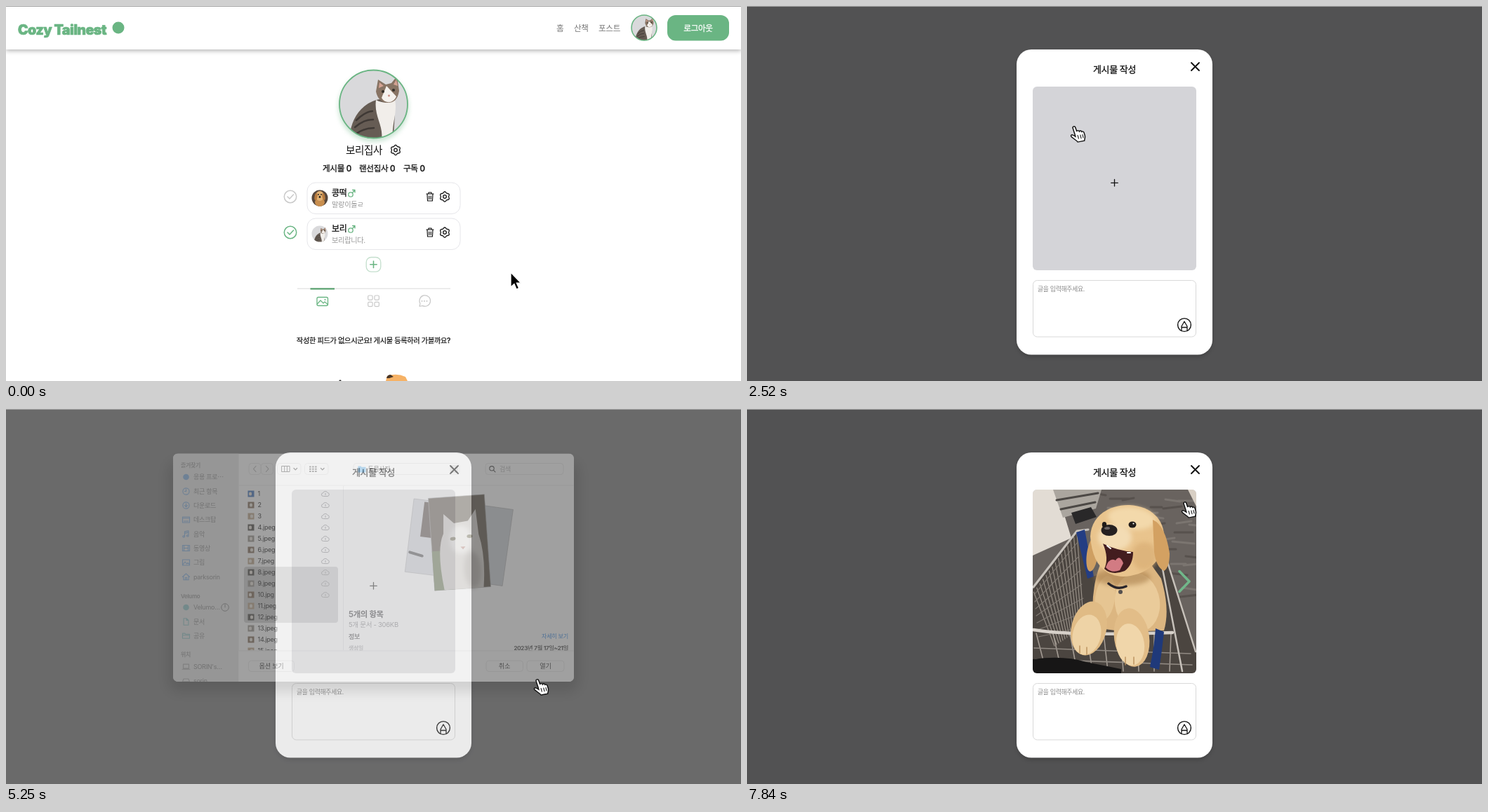
Recreate the animation shown at these times as an HTML page. Size 1047x535 px, loop 8 s.

```html
<!DOCTYPE html>
<html lang="ko">
<head>
<meta charset="utf-8">
<title>게시물 작성</title>
<style>
html, body { margin: 0; width: 100%; height: 100%; overflow: hidden; background: #fff; }
svg { display: block; }
text { font-family: Inter, "Noto Sans CJK KR", "Noto Sans KR", "Noto Sans CJK", sans-serif; letter-spacing: -.03em; white-space: pre; }
.line { fill: none; stroke-linecap: round; stroke-linejoin: round; }
</style>
</head>
<body>
<svg id="stage" width="1047" height="535" viewBox="0 0 1047 535"></svg>
<script>
const GREEN = '#6ab583', BLUE = '#1f7be0', TEAL = '#3aa3a8';
const LOOP = 8000, STEP = 70;

// Markup helpers; text is placed by its vertical middle, and medium weight gets a hairline stroke.
const text = (s, x, cy, size, fill = '#111', weight = 400, anchor = 'start', extra = '') =>
  `<text x="${x}" y="${cy + size * .37}" font-size="${size}" fill="${fill}" font-weight="${weight}" text-anchor="${anchor}" ` +
  `${weight === 500 ? `stroke="${fill}" stroke-width="${size * .022}"` : ''} ${extra}>${s}</text>`;
const rect = (x, y, w, h, r, fill, extra = '') =>
  `<rect x="${x}" y="${y}" width="${w}" height="${h}" rx="${r}" fill="${fill}" ${extra}/>`;
const circle = (x, y, r, fill, extra = '') => `<circle cx="${x}" cy="${y}" r="${r}" fill="${fill}" ${extra}/>`;
const oval = (x, y, rx, ry, fill, turn = 0, extra = '') =>
  `<ellipse cx="${x}" cy="${y}" rx="${rx}" ry="${ry}" fill="${fill}" transform="rotate(${turn} ${x} ${y})" ${extra}/>`;
const shape = (d, fill) => `<path d="${d}" fill="${fill}"/>`;
const line = (d, color, w = 1) => `<path class="line" d="${d}" stroke="${color}" stroke-width="${w}"/>`;
const group = (id, body, extra = '') => `<g id="${id}" ${extra}>${body}</g>`;
const range = n => [...Array(n).keys()];

function gear(x, y) {
  const pts = range(48).map(i => {
    const a = i / 48 * 2 * Math.PI, r = 6.3 + .8 * Math.cos(6 * a);
    return (x + r * Math.sin(a)).toFixed(1) + ' ' + (y + r * Math.cos(a)).toFixed(1);
  });
  return line('M' + pts.join('L') + 'Z', '#111', 1.3) + circle(x, y, 2.3, 'none', 'stroke="#111" stroke-width="1.3"');
}

const trash = (x, y) =>
  line(`M${x - 5} ${y - 4}h10M${x - 2} ${y - 4}v-2h4v2M${x - 4} ${y - 4}l.6 10h6.8l.6-10M${x - 1.3} ${y - 1}v4.5M${x + 1.3} ${y - 1}v4.5`, '#111', 1.2);

const cloud = (x, y) =>
  line(`M${x - 3} ${y + 3.5}a2.4 2.4 0 0 1-.3-4.8 3.4 3.4 0 0 1 6.3-.3 2.6 2.6 0 0 1 .4 5.1zM${x} ${y - .8}v2.4`, '#777', .9);

const cat = circle(523.5, 140, 49, '#d9d9db') + `<g clip-path="url(#avatar)">` +
  shape('M489 190C491 158 508 138 532 133L552 140C556 158 551 175 553 190Z', '#665c54') +
  shape('M527 134C538 140 549 138 554 133C558 152 549 168 551 190H535C538 170 524 158 527 134Z', '#f1eeea') +
  line('M499 163q12-12 23-13M497 173q12-11 26-11M499 182q12-8 25-8', '#3f3935', 2.5) +
  shape('M527 122L530 105 541 112 549 110 557 100 560 121C558 134 552 138 544 138 535 138 529 132 527 122Z', '#887464') +
  shape('M542 114L535 131C540 140 552 139 556 129Z', '#f5f2ee') +
  shape('M531 117l1-8 6 5zM552 112l4-7 2 9z', '#d5a393') +
  circle(537, 122, 2.1, '#332f29') + circle(552, 120, 2.1, '#332f29') + circle(545.5, 128, 1.4, '#c98c82') + '</g>';

const dogThumb = circle(447, 274, 11.5, '#57483d') + oval(447, 280, 7, 6, '#c98f4f') +
  oval(447, 271, 6, 7, '#e3b273') + oval(441.5, 272, 2, 5, '#b87b3e', 10) + oval(452.5, 272, 2, 5, '#b87b3e', -10) +
  circle(445, 269, .9, '#222') + circle(449, 269, .9, '#222') + circle(447, 272.5, 1.4, '#222');

function petCard(y, name, about, thumb, on) {
  const color = on ? GREEN : '#c9c9c9';
  return circle(405, y + 20, 8.7, 'none', `stroke="${color}" stroke-width="1.5"`) +
    line(`M401 ${y + 20}l3 3 5.5-6`, color, 1.5) +
    rect(429, y, 218, 44.5, 12, '#fff', 'stroke="#e6e6ea"') + thumb +
    text(name, 464, y + 15, 12, '#111', 500) + text(about, 464, y + 31, 10.2, '#999') +
    circle(491, y + 17, 3.2, 'none', `stroke="${GREEN}" stroke-width="1.3"`) +
    line(`M493.5 ${y + 14.5}l3.5-4m-3.4 0h3.4v3.4`, GREEN, 1.3) + trash(604, y + 20) + gear(625, y + 20);
}

const profile = rect(0, 0, 1047, 535, 0, '#fff') +
  rect(0, 4, 1047, 60, 0, '#000', 'opacity=".3" filter="url(#soft)"') + rect(0, 0, 1047, 62, 0, '#fff') +
  text('Cozy Tailnest', 17, 33.5, 19.6, GREEN, 900, 'start', `stroke="${GREEN}" stroke-width=".7" stroke-linejoin="round"`) +
  circle(160, 31, 8.5, GREEN) +
  text('홈', 784, 31.5, 11.6, '#777') + text('산책', 809, 31.5, 11.6, '#777') + text('포스트', 844, 31.5, 11.6, '#777') +
  `<g transform="translate(909 31) scale(.37) translate(-523.5 -140)">${cat}</g>` +
  circle(909, 31, 18, 'none', `stroke="${GREEN}" stroke-width="1.6"`) +
  rect(942, 13, 88, 36.5, 12, GREEN) + text('로그아웃', 986, 31.5, 11.6, '#fff', 500, 'middle') +
  circle(523.5, 144, 50, GREEN, 'opacity=".35" filter="url(#soft)"') + cat +
  circle(523.5, 140, 48.5, 'none', `stroke="${GREEN}" stroke-width="1.8"`) +
  text('보리집사', 484, 206, 14.6) + gear(555, 205.5) +
  text('게시물 0', 451, 231.5, 11.6, '#111', 500) + text('랜선집사 0', 503, 231.5, 11.6, '#111', 500) + text('구독 0', 566, 231.5, 11.6, '#111', 500) +
  petCard(252, '콩떡', '말랑이돌ㄹ', dogThumb, false) +
  petCard(303, '보리', '보리랍니다.', `<g transform="translate(447 325) scale(.235) translate(-523.5 -140)">${cat}</g>`, true) +
  rect(513.2, 358.5, 20.6, 20.6, 7, '#fff', 'stroke="#c4dfcd" stroke-width="1.3"') + line('M518.8 368.8h9.4M523.5 364.1v9.4', GREEN, 1.6) +
  rect(415, 402.5, 218, 1.5, 0, '#e6e6e6') + rect(433.5, 402.5, 34.5, 2, 0, '#4b9a63') +
  rect(443, 415.5, 15.5, 12, 2, 'none', `stroke="${GREEN}" stroke-width="1.3"`) +
  line('M443.5 425l4.5-5 4 4 2-2 4 3.5', GREEN, 1.2) + circle(454.5, 419, 1, GREEN) +
  range(4).map(i => rect(515.7 + 9.3 * (i % 2), 413 + 9.3 * (i >> 1), 6.4, 6.4, 1.6, 'none', 'stroke="#c9c9c9" stroke-width="1.2"')).join('') +
  line('M589 428.5l1-4a7.8 7.8 0 1 1 3.3 3.1z', '#c9c9c9', 1.2) + [592.5, 596, 599.5].map(x => circle(x, 421, 1, '#c9c9c9')).join('') +
  text('작성한 피드가 없으시군요! 게시물 등록하러 가볼까요?', 523.5, 477.5, 10.2, '#111', 500, 'middle') +
  shape('M541 535L543 528Q556 523 569 529L572 535Z', '#f6b266') + shape('M542 531q1-5 6-5l4 3-6 2z', '#493626') +
  shape('M474 535l2-2 2 2z', '#333');

const carpet = rect(407, 115, 233, 262, 0, '#69635f') +
  range(48).map(i => line(`M${495 + i * 37 % 140} ${120 + i * 23 % 150}l${16 + i % 4 * 5} ${3 - i % 3 * 3}`, i % 2 ? '#7b7570' : '#57514d', 3)).join('') +
  shape('M407 115H441L462 184 407 209Z', '#e2dcd4') + shape('M436 115H505L497 142 450 155Z', '#aba69f') +
  line('M441 130L500 120M447 143L496 133', '#4c4845', 3) + shape('M462 148l28-8 8 14-30 10z', '#292829') +
  shape('M628 115h12v24z', '#d8cfc4');

const cart = shape('M407 258L470 176 488 240 598 212 640 345V377H407Z', '#4b4540') +
  range(15).map(i => line(`M${470 - i * 4.4} ${177 + i * 6}L${480 - i * 3} ${310 + i * 2}`, '#989087', 1.2)).join('') +
  range(7).map(i => line(`M${409 + i} ${265 + i * 10}L${471 + i * 2} ${190 + i * 20}`, '#817a73', 1.1)).join('') +
  line('M408 254L470 174 486 172', '#c8c3bd', 3) + shape('M469 176l12-4 13 67-9 3z', '#233d83') +
  range(9).map(i => line(`M${412 + i * 24} 320l${14 - i * 2} 54`, '#a39b93', 1.6)).join('') +
  line('M409 341L632 349M411 357L634 365', '#918a83', 1.6) +
  line('M597 212L639 346M592 228L620 374', '#c7c1ba', 2.5) +
  shape('M407 357q45-6 76 4l50 10v6H407z', '#171616');

const dogBody = shape('M503 222Q488 262 494 312L540 318 594 316Q603 286 590 242L570 214Z', '#dcb681') +
  oval(556, 276, 32, 42, '#eacb9a', -8) + oval(510, 270, 14, 32, '#e6c592', 8) +
  line('M408 315Q460 324 606 319', '#d7d1ca', 4.5) +
  shape('M574 368q6-28 8-55l12 5q-3 28-7 54z', '#1f397a') +
  oval(487, 313, 25, 39, '#e0bb85', 13) + oval(484, 322, 20, 29, '#eed3a6', 13) +
  oval(548, 326, 25, 42, '#e2bd88', -8) + oval(546, 336, 20, 30, '#f0d6aa', -8) +
  line('M474 338v10M484 340v10M539 354v11M551 354v10', '#b98f5c', 1.4);

const dogHead = oval(535, 240, 40, 12, '#a97f4c', 0, 'opacity=".6" filter="url(#soft)"') +
  oval(492, 207, 8, 25, '#cf9f62', 8) +
  shape('M489 182C490 152 517 136 545 137 578 139 597 160 594 190 590 222 564 238 536 239 508 238 492 220 489 182Z', '#e9c48d') +
  oval(548, 156, 34, 16, '#f3d9ab', 6, 'filter="url(#soft)"') +
  oval(566, 210, 18, 20, '#d9ae74', 0, 'opacity=".7" filter="url(#soft)"') +
  shape('M578 158Q596 166 602 206 602 226 594 231 583 226 580 204Z', '#d3a162') +
  oval(524, 183, 24, 19, '#f3dcb4', 0, 'filter="url(#soft)"') +
  shape('M507 192Q527 202 550 204Q550 222 538 231 520 238 509 228Q516 213 507 192Z', '#431d1f') +
  shape('M511 226Q516 211 525 216 531 207 536 220L531 230Q519 235 511 226Z', '#d27b83') + line('M513 195l5 4M542 205l4 0', '#fff', 2) +
  oval(516, 173, 11.5, 8, '#252020') + oval(513, 170, 4, 2, '#6a6262') +
  oval(509, 165, 3.2, 4, '#201b19') + oval(549, 165, 5.5, 4.5, '#201b19') + circle(550.5, 163.5, 1.1, '#fff') +
  line('M515 249Q527 259 540 253', '#28242a', 3.5) + circle(532, 261, 3, '#55504f');

const puppy = `<g filter="url(#lens)">${carpet + cart + dogBody + dogHead}</g>` + line('M616 231.5L630 246 616 260.5', '#71b78a', 3.5);

const modal = rect(0, 0, 1047, 535, 0, '#525253') +
  rect(385, 66, 277, 434, 21, '#000', 'opacity=".22" filter="url(#soft)"') + rect(384, 62, 279, 435.5, 21, '#fff') +
  text('게시물 작성', 523.5, 90.5, 13, '#111', 500, 'middle') + line('M633 81l11 11m0-11l-11 11', '#111', 1.9) +
  rect(407, 115, 233, 262, 6, '#d4d4d8') + line('M518.7 252.3h9.6M523.5 247.5v9.6', '#111', 1.3) +
  group('photo', puppy, 'clip-path="url(#photoBox)"') +
  rect(407.5, 391.5, 232, 80.5, 6, '#fff', 'stroke="#d9d9d9"') + text('글을 입력해주세요.', 414, 404, 8.8, '#888') +
  circle(623, 455, 9.4, 'none', 'stroke="#111" stroke-width="1.4"') + line('M619 463v-6l4-7 4 7v6M619.3 458.5h7.4', '#111', 1.3);

const alertBox = rect(0, 0, 1047, 535, 0, 'rgba(24,24,25,.75)') + rect(342, 187, 363, 186, 16, '#dbdbdb') +
  text('사진은 최대 3개만 첨부할 수 있습니다.', 523.5, 250.5, 14.7, '#111', 500, 'middle') +
  rect(451, 283.5, 145, 36.5, 12, GREEN) + text('확인', 523.5, 302, 11.8, '#fff', 500, 'middle');

// Sidebar icons are drawn around 0,0.
const box = (w, h) => `M${-w / 2} ${-h / 2}h${w}v${h}h${-w}z`;
const ring = 'M-4.6 0a4.6 4.6 0 1 0 9.2 0a4.6 4.6 0 1 0-9.2 0';
const sidebar = [
  ['응용 프로⋯', 111.5, BLUE], ['최근 항목', 132, BLUE, ring + 'M0-2.8V0h-2'], ['다운로드', 152, BLUE, ring + 'M0-2.4v4.6m-2-2l2 2 2-2'],
  ['데스크탑', 172.5, BLUE, box(10, 8) + 'M-5-2.2h10M-3 2h6'], ['음악', 193, BLUE, 'M-2 3.4v-7l5.5-1v7M-2-1.4l5.5-1M-2 3.4a1.3 1.1 0 1 1-1-1M3.5 2.4a1.3 1.1 0 1 1-1-1'],
  ['동영상', 213, BLUE, box(10, 8) + 'M-3-4v8M3-4v8M-3 0h6'], ['그림', 233.5, BLUE, box(10, 8) + 'M-4.5 3l3-4 2.5 3 1.5-1.5 2 2'],
  ['parksorin', 254, BLUE, 'M-5 0l5-4.6 5 4.6M-3.6-1v5.2h7.2V-1M-1 4V1h2v3'], ['Velumo…', 297.5, TEAL],
  ['문서', 318, TEAL, 'M-3.4-4.8h4l2.8 2.8v6.8h-6.8zM.6-4.8v2.8h2.8'], ['공유', 338, TEAL, 'M-5 3.8v-7.2h3.4l1 1.2H5v6zM-5-.8H5'],
  ["SORIN's…", 382, '#777', 'M-4-3.4h8v6h-8zM-5.4 3.8h10.8'], ['sorin', 402.5, '#777', 'M-5 1l1.6-4h6.8L5 1v3H-5zM-5 1H5']
].map(([name, y, color, d]) =>
  (d ? `<g transform="translate(256.5 ${y})">${line(d, color, 1.1)}</g>` : circle(256.5, y, 4.3, color)) + text(name, 267, y, 9, '#333')).join('');

const button = (x, y, w, h) => rect(x, y, w, h, 4, '#fff', 'stroke="#e2e2e2" stroke-width=".9"');
const fileName = i => i < 3 ? `${i + 1}` : `${i + 1}.${i === 9 ? 'jpg' : 'jpeg'}`;
const thumbColor = i => i ? ['#765d47', '#8f8a82', '#3e3a36', '#b59b7d'][(i * 7 + 1) % 4] : '#2a62b4';
const rowY = i => 135.5 + 16 * i;
const rows = range(15).map(i => {
  const y = rowY(i);
  return `<g class="row">${rect(344.5, y - 4.5, 9, 9, 0, thumbColor(i)) + rect(346 + i % 3, y - 2.5, 4, 5, 1.5, '#e6ded3')}` +
    `${text(fileName(i), 358.5, y, 9)}${i < 10 ? cloud(455, y) : ''}</g>`;
}).join('');

const photoCard = (x, y, w, h, turn, fill, extra = '') =>
  `<g transform="translate(${x} ${y}) rotate(${turn})">${rect(-w / 2, -h / 2, w, h, 0, fill, 'stroke="#999" stroke-width=".6"')}${extra}</g>`;
const stack = photoCard(602, 198, 55, 105, 7, '#d3d5da', rect(-12, -50, 38, 50, 0, '#3d2e27') + line('M-24 24l18 3', '#333', 4)) +
  photoCard(690, 209, 50, 110, 8, '#c6cad0') +
  photoCard(646, 205, 80, 132, -4, '#4a4032',
    rect(-40, 10, 34, 56, 0, '#56683c') + shape('M-26 66Q-34 8-22-14L-20-42-6-28 14-30 26-46 28-10Q36 20 30 66Z', '#cfcac4') +
    oval(2, -4, 16, 20, '#efece8', 0, 'filter="url(#soft)"') + oval(16, 40, 12, 26, '#a8a29b', 0, 'filter="url(#soft)"') +
    oval(-9, -6, 4, 2.5, '#6d684a') + oval(15, -8, 4, 2.5, '#6d684a') + shape('M1 6h7l-3.5 4z', '#b98478'));

const dialog = rect(232, 90, 583, 327, 14, '#000', 'opacity=".32" filter="url(#wide)"') +
  `<g clip-path="url(#sheet)">` + rect(238, 78, 571, 326, 0, '#fff') + rect(238, 78, 93.5, 326, 0, '#e2e2e2') +
  text('즐겨찾기', 249, 94.5, 7.9, '#8d8d8d', 500) + text('Velumo', 249, 281.5, 7.9, '#8d8d8d', 600) + text('위치', 249, 364.5, 7.9, '#8d8d8d', 500) +
  group('places', sidebar) + circle(312, 297.5, 5.3, 'none', 'stroke="#777" stroke-width=".9"') + line('M312 297.5v-4', '#777', .9) +
  button(346, 92, 17, 16) + button(363.5, 92, 17, 16) + line('M356 96l-3.5 4 3.5 4M370.5 96l3.5 4-3.5 4', '#aaa', 1.1) +
  button(386.5, 92, 33.5, 16) + line('M393 96h11v8h-11zM396.7 96v8M400.4 96v8', '#444') +
  button(425.5, 92, 33.5, 16) + line('M410 99l2.3 2.4 2.3-2.4M448.5 99l2.3 2.4 2.3-2.4', '#333', 1.2) +
  range(9).map(i => rect(432 + 4 * (i % 3), 96 + 3.2 * Math.floor(i / 3), 2.7, 2, .4, '#555')).join('') +
  button(495, 92, 151, 16) + shape('M501.5 96h4l1 1.2h6v7.8h-11z', '#5fb3ee') + text('동물사진', 515.5, 100, 8.9) +
  rect(632.5, 94.5, 11.5, 11.5, 3, BLUE, 'id="stepper"') + line('M636.2 98.8l2-2 2 2M636.2 101.8l2 2 2-2', '#fff') +
  button(683, 92, 111, 16) + circle(692, 99.3, 3.2, 'none', 'stroke="#333" stroke-width="1.1"') + line('M694.5 101.8l2.5 2.5', '#333', 1.1) + text('검색', 703, 100, 9, '#aaa') +
  rect(331.5, 123, 478, 1, 0, '#e8e8e8') + rect(480, 124, 1, 235, 0, '#e5e5e5') +
  `<g clip-path="url(#list)">` + rect(339, rowY(7) - 8, 134, 16, 4, '#0a60d8', 'id="pick"') + rows + '</g>' +
  group('info', group('stack', stack) + text('', 488, 307, 11.4, '#222', 600, 'start', 'id="title"') +
    text('', 488, 321.5, 9.5, '#777', 400, 'start', 'id="kind"') + text('정보', 488, 339, 9, '#222', 500) +
    text('자세히 보기', 801, 339, 8.1, BLUE, 400, 'end') + text('생성일', 488, 355.5, 7.9, '#777') +
    text('', 801, 355.5, 8.2, '#222', 500, 'end', 'id="date"')) +
  rect(331.5, 359, 478, 45, 0, '#fff') + rect(331.5, 359, 478, 1, 0, '#e8e8e8') +
  button(345.5, 373.5, 65, 15.5) + text('옵션 보기', 378, 381.5, 9.2, '#222', 400, 'middle') +
  button(684, 373.5, 52.5, 15.5) + text('취소', 710, 381.5, 9.2, '#222', 400, 'middle') +
  rect(742, 373.5, 53, 15.5, 4, '#fff', 'id="open" stroke="#e2e2e2" stroke-width=".9"') +
  text('열기', 768.5, 381.5, 9.2, '#bbb', 400, 'middle', 'id="openText"') + '</g>';

const beam = 'M-4-10.5Q0-10.5 0-7.5 0-10.5 4-10.5M0-7.5V7.5M-4 10.5Q0 10.5 0 7.5 0 10.5 4 10.5M-2 1H2';
const cursors =
  group('arrow', '<path d="M0 0V21L4.9 16.5 8.1 24 11.6 22.5 8.4 15.2H14.6Z" fill="#000" stroke="#fff" stroke-width="1.3"/>') +
  group('hand', '<path d="M5.5 12L3 3.5C2.2.6 5.6-.2 6.4 2.3L8.3 8.3C8.5 6.6 11 6.3 11.6 8.2 12.2 6.8 14.3 6.9 15 8.8 15.8 7.8 17.5 8.3 18 10L19.2 14.5C20 18 18.6 20 18.5 22L9.5 24C8 21 4 19.5 1 16.2-.5 14.2 1.3 12.7 3 13.6L6.5 15.8Z" fill="#fff" stroke="#111" stroke-width="1.4"/>' +
    line('M9.5 14l1.2 5M13 13.5l1.2 5M16 13l1 4.5', '#222', 1.1), 'transform="translate(-4 -1) scale(1.06 .96)"') +
  group('beam', line(beam, '#fff', 3) + line(beam, '#111', 1.4));

document.getElementById('stage').innerHTML = `<defs>
  <filter id="lens"><feGaussianBlur stdDeviation=".6"/></filter>
  <filter id="soft" x="-40%" y="-40%" width="180%" height="180%"><feGaussianBlur stdDeviation="3"/></filter>
  <filter id="wide" x="-20%" y="-20%" width="140%" height="140%"><feGaussianBlur stdDeviation="9"/></filter>
  <clipPath id="avatar">${circle(523.5, 140, 49, '#000')}</clipPath>
  <clipPath id="photoBox">${rect(407, 115, 233, 262, 6, '#000')}</clipPath>
  <clipPath id="sheet">${rect(238, 78, 571, 325.5, 7, '#000')}</clipPath>
  <clipPath id="list">${rect(331, 124, 149, 235, 0, '#000')}</clipPath></defs>` +
  group('profile', profile) + group('modal', modal) + rect(0, 0, 1047, 535, 0, '#aeaeae', 'id="veil"') +
  group('dialog', dialog) + group('alert', alertBox) + rect(0, 0, 1047, 1, 0, '#a3a3a3') + group('cursor', cursors);

const el = id => document.getElementById(id);
const rowLabels = [...document.querySelectorAll('.row text')];
const show = (id, on) => { el(id).style.display = on ? '' : 'none'; };
const set = (id, attrs) => { for (const k in attrs) el(id).setAttribute(k, attrs[k]); };
const ease = p => p * p * (3 - 2 * p);

// time, x, y, pointer shape from that time on
const path = [
  [0, 719, 380, 'arrow'], [140, 716, 397, 'arrow'], [210, 716, 397, 'arrow'], [1050, 600, 474, 'hand'],
  [1120, 600, 471, 'beam'], [1820, 587, 439, 'beam'], [2030, 587, 439, 'beam'], [2170, 555, 370, 'hand'],
  [2520, 465, 172, 'hand'], [3290, 465, 172, 'hand'], [3360, 448, 190, 'arrow'], [3570, 387, 249, 'arrow'],
  [4060, 387, 249, 'arrow'], [4130, 388, 311, 'arrow'], [4340, 388, 312, 'arrow'], [4900, 756, 386, 'arrow'],
  [5110, 756, 386, 'hand'], [5250, 756, 386, 'hand'], [5320, 738, 380, 'arrow'], [5390, 668, 350, 'arrow'],
  [5530, 668, 350, 'arrow'], [5880, 552, 306, 'hand'], [5950, 548, 304, 'hand'], [6230, 548, 304, 'hand'],
  [7000, 604, 178, 'hand'], [7280, 623, 133, 'hand'], [LOOP, 623, 133, 'hand']
];
// dialog presence: 0 hidden, 1 fully down
const sheet = [[3220, 0], [3290, .59], [3360, .86], [3430, 1], [4970, 1], [5040, .95], [5250, .42], [5390, 0]];

function sample(keys, t, col, curve = p => p) {
  if (t <= keys[0][0]) return keys[0][col];
  const i = keys.findIndex(k => k[0] > t);
  if (i < 0) return keys[keys.length - 1][col];
  const a = keys[i - 1], b = keys[i];
  return a[col] + (b[col] - a[col]) * curve((t - a[0]) / (b[0] - a[0]));
}

function drawDialog(t) {
  const p = sample(sheet, t, 1), closing = t > 4970;
  show('dialog', p > 0);
  set('veil', { opacity: .593 * p });
  set('dialog', { transform: `translate(0 ${-25 * (1 - p)})`, opacity: closing ? p * .87 : 1 });
  set('places', { opacity: closing ? .55 : 1 });
  set('stepper', { fill: closing ? '#ddd' : BLUE });
  const count = t < 3850 ? 0 : t < 4270 ? 1 : 5, active = count > 0 && t < 4970;
  show('pick', count);
  set('pick', { height: 16 * Math.max(count, 1), fill: active ? '#0a60d8' : '#cdcdcd' });
  rowLabels.forEach((label, i) => label.setAttribute('fill', active && i >= 7 && i < 7 + count ? '#fff' : '#111'));
  show('info', count);
  show('stack', count > 1);
  el('title').textContent = count > 1 ? '5개의 항목' : '8.jpeg';
  el('kind').textContent = count > 1 ? '5개 문서 - 306KB' : 'JPEG 이미지 - 42KB';
  el('date').textContent = count > 1 ? '2023년 7월 17일~21일' : '2023년 7월 17일 월요일 오후 1:14';
  set('open', { fill: active ? '#1780f5' : '#fff' });
  set('openText', { fill: active ? '#fff' : count ? '#222' : '#bbb' });
}

function draw(t) {
  show('profile', t < 1120);
  show('modal', t >= 1120);
  show('photo', t >= 6300);
  show('alert', t >= 5530 && t < 6230);
  drawDialog(t);
  const pointer = path.filter(k => k[0] <= t).pop()[3];
  for (const id of ['arrow', 'hand', 'beam']) show(id, id === pointer);
  set('cursor', { transform: `translate(${sample(path, t, 1, ease)} ${sample(path, t, 2, ease)})` });
}

const start = performance.now();
function tick() {
  const t = (performance.now() - start) % LOOP;
  draw(Math.floor(t / STEP) * STEP);
  requestAnimationFrame(tick);
}
tick();
</script>
</body>
</html>
```
